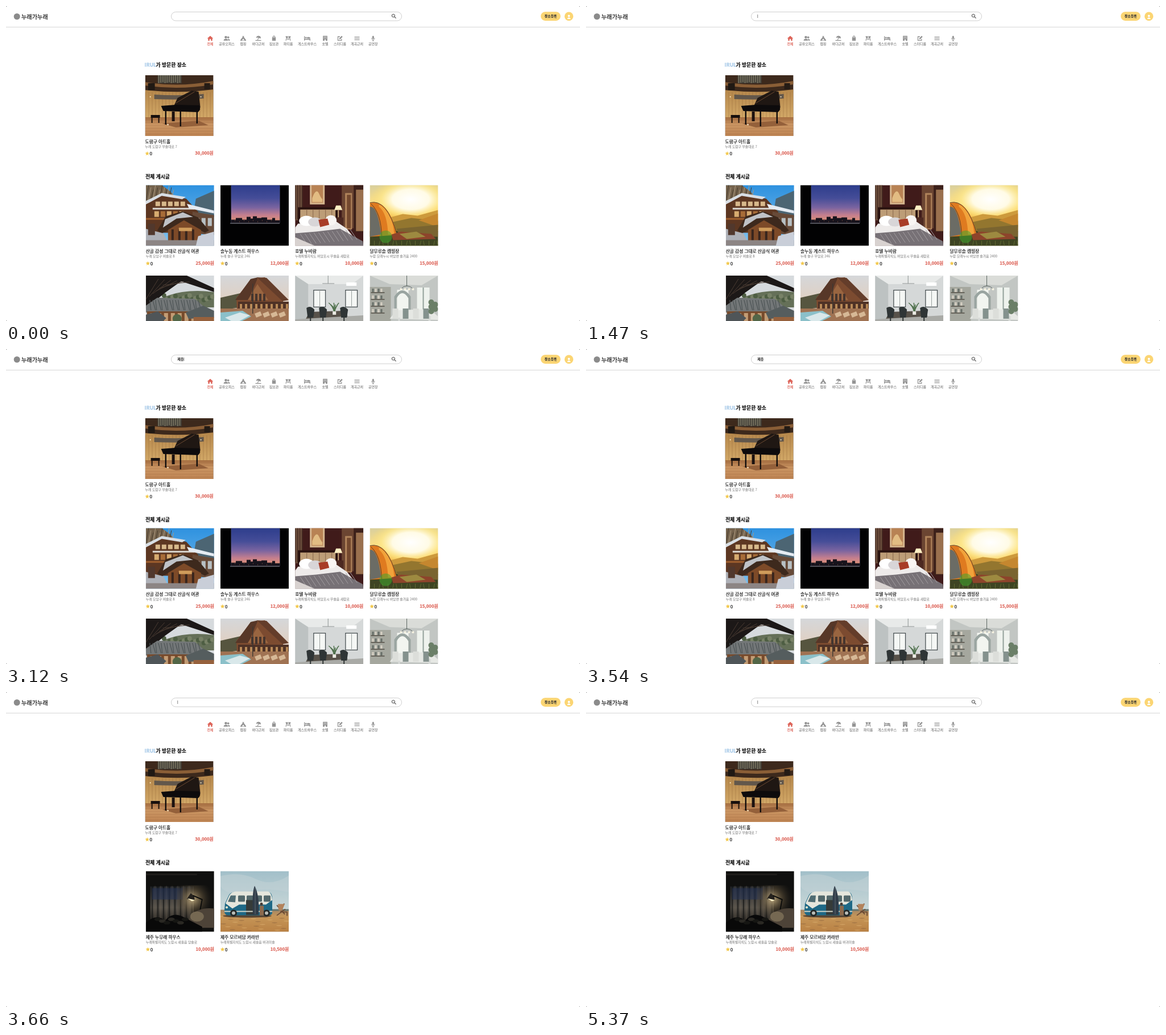
Recreate the animation shown at these times as an HTML page. Size 1009 px wide and 555 px high, loop 5.52 s.

```html
<!DOCTYPE html>
<html lang="ko">
<head>
<meta charset="utf-8">
<title>장소 검색</title>
<style>
html, body { margin: 0; width: 100%; height: 100%; overflow: hidden; background: #fff; }
svg { display: block; }
text { font-family: "Noto Sans CJK KR", "Noto Sans CJK", "Noto Sans", sans-serif; }
</style>
</head>
<body>
<svg id="stage" width="1009" height="555" viewBox="0 0 1009 555"></svg>
<script>
const LOOP = 5520;
const GRAY = '#949494', RED = '#dd6459', GOLD = '#fbd573';

// Shape helpers
const rect = (x, y, w, h, fill, more = '') => `<rect x="${x}" y="${y}" width="${w}" height="${h}" fill="${fill}" ${more}/>`;
const poly = (points, fill) => `<polygon points="${points}" fill="${fill}"/>`;
const oval = (x, y, rx, ry, fill) => `<ellipse cx="${x}" cy="${y}" rx="${rx}" ry="${ry}" fill="${fill}"/>`;
const dot = (x, y, r, fill) => oval(x, y, r, r, fill);
const path = (d, fill) => `<path d="${d}" fill="${fill}"/>`;
const line = (d, color, w = 1) => `<path d="${d}" fill="none" stroke="${color}" stroke-width="${w}"/>`;
const row = (n, draw) => Array.from({ length: n }, (_, i) => draw(i)).join('');

// A hairline stroke gives the letters a medium weight
const label = (x, y, size, str, fill = '#111', weight = 500, anchor = 'start') =>
  `<text x="${x}" y="${y}" font-size="${size}" fill="${fill}" stroke="${fill}" stroke-width="${size * 0.025}" font-weight="${weight}" text-anchor="${anchor}">${str}</text>`;

let defs = '';
function fade(id, stops, kind = 'linear', attrs = 'x2="0" y2="1"') {
  const list = stops.map(([at, color, alpha = 1]) => `<stop offset="${at}" stop-color="${color}" stop-opacity="${alpha}"/>`);
  defs += `<${kind}Gradient id="${id}" ${attrs}>${list.join('')}</${kind}Gradient>`;
  return `url(#${id})`;
}

function star(x, y, r) {
  const pts = Array.from({ length: 10 }, (_, i) => {
    const a = Math.PI * (i / 5 - 0.5), d = i % 2 ? r * 0.48 : r;
    return `${(x + d * Math.cos(a)).toFixed(2)},${(y + d * Math.sin(a)).toFixed(2)}`;
  });
  return poly(pts.join(' '), '#f3c94f');
}

// Photos, each in a 120 x 107 box
const photos = {
  hall: () => rect(0, 0, 120, 107, '#3d291c')
    + rect(22, 0, 42, 14, '#45423a') + row(11, i => rect(23 + i * 3.7, 0, 1.7, 14 - i % 3, '#77725f'))
    + path('M0 12Q60 22 120 10V16Q60 27 0 18Z', '#8a5e36')
    + path('M0 26Q60 33 120 25V75H0Z', fade('wood', [[0, '#b5874b'], [1, '#d2a867']]))
    + row(20, i => rect(i * 6, 30, .8, 44, '#93693a', 'opacity=".5"'))
    + path('M16 34Q60 37 103 33V41Q60 44 16 42Z', '#62574b')
    + rect(5, 14, 12, 12, '#201914') + rect(104, 14, 10, 11, '#241b15')
    + rect(0, 74, 120, 33, fade('floor', [[0, '#a46d40'], [.4, '#cb9663'], [1, '#bd8352']]))
    + row(6, i => rect(0, 78 + i * 5, 120, .6, '#94603a', 'opacity=".45"'))
    + poly('30,85 94,80 111,88 54,92', '#94603a')
    + poly('50,55 57,40 82,27 94,29 97,57', '#1f1713')
    + line('M54 49L87 29', '#6b4931', 1)
    + path('M28 54L54 52L95 53Q99 60 93 65L32 63Z', '#0d0b0c')
    + rect(35, 62, 2.4, 25, '#110d0c') + rect(61, 64, 2.4, 26, '#110d0c') + rect(90, 61, 2.4, 24, '#110d0c')
    + rect(47, 64, 5, 17, '#1c1210')
    + rect(10, 70, 16, 5, '#17100e') + rect(11, 74, 2, 10, '#21140d') + rect(23, 74, 2, 10, '#21140d')
    + dot(40, 87, 1.3, '#fff2cf') + dot(9, 38, 1, '#fff2cf') + dot(98, 38, 1, '#fff2cf'),

  inn: () => rect(0, 0, 120, 107, fade('blue', [[0, '#2e91df'], [1, '#83c4ef']]))
    + poly('0,0 28,0 44,12 58,30 0,44', '#75634d')
    + row(12, i => line(`M${i * 4} 30L${i * 4 + 5} ${i % 3 * 4}`, i % 2 ? '#ad9b82' : '#443a2c', 1))
    + poly('88,24 120,10 120,56 84,48', '#4c6573')
    + poly('0,34 26,17 71,24 92,47 92,84 0,84', '#5d3722')
    + poly('0,28 28,14 70,21 64,25 28,19 0,34', '#d8dee4')
    + row(5, i => rect(17 + i * 11, 29, 8, 8, '#d8b98c') + rect(15 + i * 11, 46, 8, 10, i % 2 ? '#a86c37' : '#d7ab70'))
    + rect(12, 40, 73, 3, '#dbd8d2') + rect(0, 58, 85, 3, '#a1602f')
    + poly('72,33 120,45 120,50 76,41', '#e5ebf2') + poly('82,47 120,53 120,88 82,85', '#674a38')
    + row(3, i => rect(87 + i * 11, 58, 7, 14, '#b7bfc2'))
    + poly('20,80 35,55 65,46 92,57 111,80 104,84 68,66 28,85', '#3d291d')
    + poly('34,60 65,48 83,56 54,59 30,75', '#bfc2c7')
    + poly('39,79 67,62 97,79 97,99 39,99', '#7d4a28')
    + row(4, i => rect(45 + i * 12, 78, 4, 22, '#38251d')) + rect(58, 75, 23, 6, '#d09c5b')
    + poly('0,77 31,85 42,107 0,107', '#aeb1b8') + rect(0, 97, 120, 10, '#8c8584')
    + poly('92,90 120,82 120,107 88,107', '#c9ced8') + rect(4, 68, 12, 20, '#51382d'),

  dusk: () => rect(0, 0, 120, 107, '#020203')
    + rect(19, 0, 86, 66, fade('dusk', [[0, '#2d3d8c'], [.35, '#454d98'], [.6, '#7a64a0'], [.8, '#c57f8e'], [1, '#e3956f']]))
    + path('M19 67V61H27V58H38V61H46V56H53V59H57V55H64V58H72V57H82V61H91V58H96V62H105V67Z', '#17131c')
    + row(9, i => rect(25 + i * 8, 62 + i % 2 * 2, 1, 1, '#a06b4d'))
    + rect(17, 66.8, 87, 1, '#9b9ca8') + rect(18, 0, .8, 67, '#30344d') + rect(104, 0, .8, 67, '#252738'),

  hotel: () => rect(0, 0, 120, 107, '#401b1a')
    + rect(0, 0, 13, 62, '#6b4d3b') + row(4, i => rect(i * 4, 0, 1, 60, '#3a241e'))
    + rect(26, 0, 26, 34, '#d6b68f') + rect(29, 0, 20, 31, '#b88254') + path('M30 23Q37 4 42 15T48 24V30H30Z', '#e2bc83')
    + rect(82, 0, 38, 76, '#6b4532') + rect(88, 14, 12, 64, '#b1845c') + rect(91, 17, 7, 59, '#74492f')
    + rect(103, 0, 17, 83, '#3c201a') + rect(107, 8, 13, 73, '#9a704e')
    + rect(5, 39, 70, 34, '#29120f') + rect(9, 43, 62, 24, '#bd9d77') + row(5, i => rect(20 + i * 11, 43, 1, 24, '#88674c'))
    + poly('72,36 80,36 83,44 69,44', '#fff0c4') + rect(75, 44, 2, 13, '#c1a078') + rect(69, 57, 16, 22, '#4d2921')
    + poly('5,68 72,64 91,77 115,107 0,107 0,75', '#eeebea')
    + oval(20, 63, 13, 9, '#fff') + oval(35, 65, 12, 8, '#d8d5d7') + oval(63, 62, 10, 9, '#f8f5f3')
    + poly('41,61 57,59 60,70 44,74', '#a83c27')
    + poly('0,85 37,82 79,77 119,99 120,107 30,107 0,92', '#777176')
    + row(12, i => line(`M${i * 8 + 9} ${86 - i * .7}l12 18`, '#a29da0', 1))
    + poly('0,92 35,107 0,107', '#d8d2d0'),

  camp: () => rect(0, 0, 120, 107, fade('morning', [[0, '#d9cf9c'], [.3, '#fbe08a'], [.55, '#efb443'], [1, '#735a25']]))
    + rect(0, 0, 120, 66, fade('sun', [[0, '#fff'], [.45, '#fffbe6'], [.72, '#ffe88a', .75], [1, '#ffdc68', 0]], 'radial', 'cx=".6" cy=".38" r=".6"'))
    + poly('32,58 58,51 84,54 120,44 120,80 40,80', '#cd9a3c')
    + poly('36,66 73,58 120,63 120,83 42,84', '#93762f') + poly('86,62 120,50 120,74', '#c5872f')
    + rect(0, 81, 120, 26, '#3e4422') + poly('47,77 120,70 120,91 53,91', '#7a6430')
    + path('M0 31Q28 25 43 70L48 88L0 91Z', '#df7b20') + path('M0 38Q14 36 20 87L0 91Z', '#6b6c65')
    + path('M16 38Q31 50 32 87H43Q40 46 16 34Z', '#f1a33b') + line('M0 31Q30 23 48 88M2 33Q20 49 21 91', '#563e2b', 1)
    + poly('38,87 55,82 108,86 116,95 41,97', '#8d442b') + poly('52,86 82,82 98,91 65,95', '#9d8a40')
    + row(16, i => line(`M${i * 8} 107l${i % 3 * 2 - 2} -9`, '#5f6a33', 1))
    + dot(28, 91, 11, '#40a92b88'),

  hanok: () => rect(0, 0, 120, 107, '#d6dadd')
    + path('M25 41Q63 22 120 29V56H20Z', '#657058')
    + row(18, i => dot(32 + i * 5, 35 + i * 7 % 9, 4, i % 2 ? '#788267' : '#4e5e43'))
    + poly('0,0 72,0 120,22 120,29 62,10 34,30 0,58', '#1c1817')
    + row(6, i => line(`M${i * 6} ${42 - i * 5}L${i * 11 + 22} ${i + 6}`, '#4a3b32', 1))
    + poly('0,53 20,39 86,41 105,57 93,63 0,65', '#737778')
    + row(18, i => line(`M${7 + i * 5} 43l${i % 2 ? 5 : 2} 18`, '#4d5455', 1.2))
    + rect(2, 63, 89, 25, '#774b2d') + row(7, i => rect(8 + i * 12, 66, 7, 17, '#c29c74'))
    + poly('70,65 101,53 120,62 120,74 75,76', '#555d5e') + rect(84, 73, 36, 12, '#96613d')
    + poly('0,69 21,63 36,75 28,82 0,82', '#4f5558') + dot(55, 76, 8, '#526647'),

  pool: () => rect(0, 0, 120, 107, fade('peach', [[0, '#d5d7d9'], [1, '#f0c5a2']]))
    + poly('0,39 35,31 42,55 0,61', '#56553f') + poly('28,39 55,6 78,3 110,41 110,65 29,65', '#7c4b30')
    + poly('26,43 53,6 66,3 49,43', '#573728') + poly('64,3 81,4 120,43 109,45', '#643d2a')
    + poly('65,15 84,43 48,43', '#996540') + row(4, i => rect(54 + i * 7, 32, 4, 13, '#47352d'))
    + rect(31, 46, 89, 20, '#4f3226') + row(10, i => rect(34 + i * 9, 50, 4, 11, '#b98a58'))
    + rect(0, 58, 120, 28, '#a07353') + poly('0,65 39,62 54,72 26,86 0,86', '#8bc0c9')
    + poly('8,74 34,65 52,70 26,84', '#d9e8ea') + rect(56, 14, 1.4, 53, '#3e3732')
    + row(4, i => poly(`${60 + i * 14},67 ${70 + i * 14},63 ${73 + i * 14},70 ${63 + i * 14},74`, '#d6b896')),

  office: () => rect(0, 0, 120, 107, '#d5d8d8')
    + poly('0,0 120,0 100,15 23,15', '#e8eae9') + poly('0,0 23,15 23,76 0,87', '#bdc2c2')
    + [32, 88].map(x => rect(x, 25, 22, 31, '#4a5254') + rect(x + 1.3, 26.3, 19.4, 28.4, '#f5f7f5') + rect(x + 11, 27, .8, 27, '#828988')).join('')
    + rect(90, 12, 18, 6, '#fff') + line('M58 0V14M48 14H69', '#8b9090', 1)
    + poly('25,64 86,62 96,77 17,80', '#575149') + poly('0,77 120,70 120,87 0,87', '#a9aaa6')
    + [20, 42, 79].map(x => path(`M${x} 57Q${x + 7} 52 ${x + 14} 60L${x + 12} 74H${x + 2}Z`, '#2f3536') + line(`M${x + 7} 71V85`, '#303535', 2)).join('')
    + row(7, i => line(`M69 65Q${66 + i} 53 ${59 + i * 3} ${48 + i % 3 * 3}`, '#50724e', 1.5)) + rect(66, 63, 6, 6, '#e9e9e2'),

  dining: () => rect(0, 0, 120, 107, '#c2c6c3')
    + poly('0,0 120,0 91,17 35,15', '#dadcd8') + rect(0, 20, 37, 68, '#a5a79e')
    + row(4, i => rect(2, 29 + i * 12, 24, 2, '#67645b') + row(4, j => rect(4 + j * 5, 23 + i * 12, 3, 6, (i + j) % 2 ? '#d6d0c3' : '#676e68')))
    + rect(48, 25, 20, 36, '#f2f5f0') + path('M43 61V37Q57 15 72 37V61H68V40Q57 22 47 40V61Z', '#9aa5a1')
    + rect(83, 21, 22, 39, '#eef2ed') + rect(93, 21, 2, 39, '#92a09a') + line('M65 0V19M54 24Q65 12 77 24', '#5c6662', 1)
    + row(4, i => dot(55 + i * 7, 24, 2, '#f6f3e2'))
    + poly('47,61 105,59 120,72 120,78 35,76', '#e6e8e4') + rect(50, 74, 3, 15, '#d7dad7') + rect(103, 71, 4, 15, '#d7dad7')
    + row(4, i => rect(40 + i * 18, 58, 10, 18, i % 2 ? '#84918d' : '#dcdeda')) + row(5, i => dot(108 + i % 2 * 7, 47 + i * 4, 5, '#6b7f68')),

  lamp: () => rect(0, 0, 120, 107, '#10100f')
    + rect(8, 27, 76, 62, fade('drape', [[0, '#23262b'], [.6, '#565149'], [1, '#25221e']]))
    + row(15, i => rect(10 + i * 5, 26, 2.3, 63, i % 2 ? '#85796633' : '#0b0c0d99'))
    + rect(11, 30, 54, 20, '#25335688') + rect(0, 5, 90, 2, '#24211e')
    + rect(55, 25, 65, 67, fade('glow', [[0, '#e9d9ab'], [.14, '#b9a377', .75], [.5, '#6b5b41', .5], [1, '#302a22', 0]], 'radial', 'cx=".42" cy=".36" r=".55"'))
    + poly('72,49 79,39 85,44 86,51', '#25221e') + poly('73,48 86,51 81,53', '#fff4ca')
    + line('M83 43L99 50L93 81', '#080909', 1.8) + path('M79 78Q94 63 120 66V100H70Z', '#4d4338')
    + oval(90, 80, 12, 9, '#756852') + path('M0 91Q18 74 34 87Q48 69 70 83L99 98V107H0Z', '#090909')
    + row(7, i => oval(21 + i * 8, 85 + i % 3 * 3, 6, 3, i % 2 ? '#2a2823' : '#161613')),

  van: () => rect(0, 0, 120, 107, fade('coast', [[0, '#a2bfc9'], [.65, '#cad8d8'], [1, '#d3d9d2']]))
    + path('M0 9Q34 0 62 14T120 8V37Q78 28 45 36T0 27Z', '#c4d3d688')
    + rect(0, 68, 120, 39, fade('sand', [[0, '#a38664'], [.3, '#c69658'], [1, '#b98144']]))
    + row(24, i => oval(i * 37 % 119, 80 + i * 7 % 26, 5, .8, i % 2 ? '#8c633c88' : '#e0b97977'))
    + rect(82, 67, 38, 3, '#66766f') + oval(47, 79, 43, 3, '#594634')
    + path('M8 57L15 42Q18 37 26 37H85Q91 38 91 49V74Q90 78 84 78H12Q6 76 7 69Z', '#1f6986')
    + path('M9 57L16 42Q20 36 28 36H84Q90 38 91 51L80 59H33L21 66Z', '#e5e6dc')
    + row(4, i => rect(31 + i * 15, 43, 12, 11, '#53686b', 'rx="1.5"')) + poly('13,54 18,43 27,43 26,55', '#506c72')
    + rect(45, 51, 18, 26, '#363b39') + rect(7, 70, 84, 2, '#ced1c5')
    + [23, 81].map(x => dot(x, 74, 6, '#242827') + dot(x, 74, 3, '#b9bcb6')).join('')
    + dot(11, 64, 2, '#f4eccd') + path('M57 77Q55 39 60 26Q69 43 67 77Z', '#303c48') + line('M61 29V76', '#768289', .7)
    + line('M99 60L113 76M112 57L106 72H117M99 78L114 67M117 72V79', '#6a4933', 1.7) + poly('101,58 113,58 108,70 102,69', '#b3835c')
    + rect(69, 61, 7, 17, '#8c6a4e') + dot(72, 58, 2.5, '#453a34')
};

const photo = (x, y, name) =>
  `<svg x="${x}" y="${y}" width="120" height="107" viewBox="0 0 120 107">${photos[name]()}</svg>`;

const card = (x, y, name, title, place, price) => photo(x, y, name)
  + label(x, y + 119.6, 7.7, title) + label(x, y + 127.7, 5.8, place, GRAY)
  + star(x + 3.6, y + 138, 3.9) + label(x + 8, y + 140.9, 7.9, '0')
  + label(x + 120, y + 140.2, 7.7, price + '원', RED, 700, 'end');

const COLS = [245.8, 377, 508.2, 639.5], TOP = 315.6;

const allPlaces = () => [
  ['inn', '산골 감성 그대로 산골식 여관', '누래 모담구 버솔로 8', '25,000'],
  ['dusk', '솔누동 게스트 하우스', '누래 솔구 무담로 246', '12,000'],
  ['hotel', '호텔 누비람', '누래특별자치도 버담포시 무솔읍 새람로', '10,000'],
  ['camp', '달무루솔 캠핑장', '누람 모래누시 버담면 솔가움 2400', '15,000']
].map((c, i) => card(COLS[i], TOP, ...c)).join('')
  + ['hanok', 'pool', 'office', 'dining'].map((n, i) => photo(COLS[i], 475, n)).join('');

const foundPlaces = () => card(COLS[0], TOP, 'lamp', '제주 누무래 하우스', '누래특별자치도 노람시 새울읍 담술로', '10,000')
  + card(COLS[1], TOP, 'van', '제주 모르비담 카라반', '누래특별자치도 노람시 새울읍 버귀미솔', '10,500');

// Icons are drawn around (0, 0)
const g = GRAY;
const categories = [
  [359, '전체', path('M-5.3 .2L0-4.6L5.3 .2H3.7V4.3H1.2V1.2H-1.2V4.3H-3.7V.2Z', RED)],
  [388, '공유오피스', dot(-1.5, -2, 2.3, g) + dot(2.7, -1.8, 1.8, g) + path('M-5.5 4Q-5 .7-1.5 .7T2.4 4ZM2 .7Q5.4 .7 5.5 4H3.2Z', g)],
  [417, '캠핑', path('M-1-4.5L0-3.4L1-4.5L1.6-3.8L.8-2.7L5 3V4.3H-5V3L-.8-2.7L-1.6-3.8ZM0 .5L-2.3 3.5H2.3Z', g)],
  [443.5, '바다근처', path('M-4-1Q-2.5-5 1.5-4.3Q5-3.4 4.2 .3L.9-.8L-.6 3H-1.7L-.1-1.4Z', g) + rect(-5, 3, 10, 1.3, g)],
  [471, '짐보관', path('M-3.2-1.7H3.2V4.3H-3.2Z', g) + line('M-1.7-1V-3Q0-5.3 1.7-3V-1', g, 1.1)],
  [496, '파티룸', path('M-4.7-3.8H4.7L3.3-.3H-3.3Z', g) + line('M-2.7-.6L-4 4M2.7-.6L4 4M-2 1.7H2', g, 1.2) + dot(0, -2, 1, '#fff')],
  [529.5, '게스트하우스', path('M-5.5-3.7H-4.2V1H5.5V4H4.2V2.4H-4.2V4H-5.5ZM-.3-2.3H3.5Q5.5-2 5.5 .4H-.3Z', g) + dot(-2.3, -1, 1.4, g)],
  [561, '호텔', rect(-3.9, -4.4, 7.8, 8.7, g) + row(6, i => rect(-2.5 + i % 3 * 2, i < 3 ? -3 : -.9, 1, 1, '#fff')) + rect(-1, 2, 2, 2.3, '#fff')],
  [587, '스터디룸', line('M0-3H-3.5V3.7H2.8V1', g, 1.3) + path('M-1.4 1.8L-1-.3L3-4.4L4.7-2.7L.7 1.4Z', g)],
  [617, '계곡근처', row(3, i => rect(-4.5, -3 + i * 2.5, 9, 1.1, g))],
  [645.3, '공연장', rect(-1.5, -4.5, 3, 5.8, g, 'rx="1.5"') + line('M-2.8-.7Q-2.8 2.5 0 2.5T2.8-.7M0 2.5V4.3M-1.7 4.2H1.7', g, .9)]
];

// Search field: each syllable block advances by the same width
const TEXT_X = 301.3, BLOCK = 5.5;

const page = rect(0, 0, 1009, 555, '#8c8c8c') + rect(0, 0, 1009, 555, '#fff', 'rx="2.5"')
  + dot(19.2, 18.5, 5.5, '#8b8b8b') + label(27, 22.6, 10.2, '누래가누래', '#222')
  + rect(0, 36.7, 1009, 1, '#d4d4d4')
  + rect(290.5, 10.5, 405, 15.5, '#fff', 'rx="7.75" stroke="#cfcfcf"')
  + '<circle cx="680.9" cy="17" r="2.6" fill="none" stroke="#444"/>' + line('M682.8 18.9L685.6 21.7', '#444', 1.1)
  + rect(940, 10.3, 34.8, 15.6, GOLD, 'rx="7.8"') + label(957.4, 20.3, 5.8, '장소등록', '#333', 700, 'middle')
  + dot(989.5, 18.3, 7.7, GOLD) + dot(989.5, 17.5, 1.9, '#fff') + path('M986.6 23Q986.8 20.3 989.5 20.3T992.4 23Z', '#fff')
  + categories.map(([x, name, icon], i) => `<g transform="translate(${x} 57)">${icon}</g>`
    + label(x, 68.7, 6, name, i ? '#858585' : RED, 500, 'middle')).join('')
  + label(243.5, 107, 8.8, 'IRUL', '#a6c9e8', 700) + label(263.4, 107, 8.8, '가 방문한 장소', '#111', 700)
  + card(244.6, 122, 'hall', '도람구 아트홀', '누래 도람구 무솔대로 7', '30,000')
  + label(245.3, 304.4, 8.7, '전체 게시글', '#111', 700)
  + `<g id="all">${allPlaces()}</g><g id="found">${foundPlaces()}</g>`
  + `<text id="query" x="${TEXT_X}" y="20" font-size="6" font-weight="500" fill="#111" stroke="#111" stroke-width=".2"></text>`
  + rect(0, 20.4, BLOCK - .3, .7, '#222', 'id="underline"')
  + rect(0, 15, .9, 6, '#777', 'id="caret"')
  + `<g id="pointer">${line('M481 12.5H484M482.5 12.5V22.5M481 22.5H484', '#444', .8)}</g>`;

document.getElementById('stage').innerHTML = `<defs>${defs}</defs>${page}`;
const [all, found, query, underline, caret, pointer] =
  ['all', 'found', 'query', 'underline', 'caret', 'pointer'].map(id => document.getElementById(id));

// Start time, typed text, caret shown
const typing = [
  [0, '', false], [1470, '', true], [1920, '', false], [2370, '', true],
  [2430, 'ㅈ', true], [2760, '제', true], [2970, '젲', true], [3120, '제주', true], [3510, '제주', false],
  [3570, '', true], [4020, '', false], [4470, '', true], [4920, '', false], [5370, '', true]
];

const show = (el, on) => el.setAttribute('visibility', on ? 'visible' : 'hidden');

function draw(t) {
  const [, text, blink] = typing.filter(step => step[0] <= t).pop();
  const end = TEXT_X + text.length * BLOCK;
  query.textContent = text;
  underline.setAttribute('x', end - BLOCK);
  caret.setAttribute('x', end);
  show(underline, text !== '');
  show(caret, blink);
  show(all, t < 3570);
  show(found, t >= 3660);
  show(pointer, t >= 4770 && t < 4860);
}

function tick() {
  draw(performance.now() % LOOP);
  requestAnimationFrame(tick);
}
tick();
</script>
</body>
</html>
```
